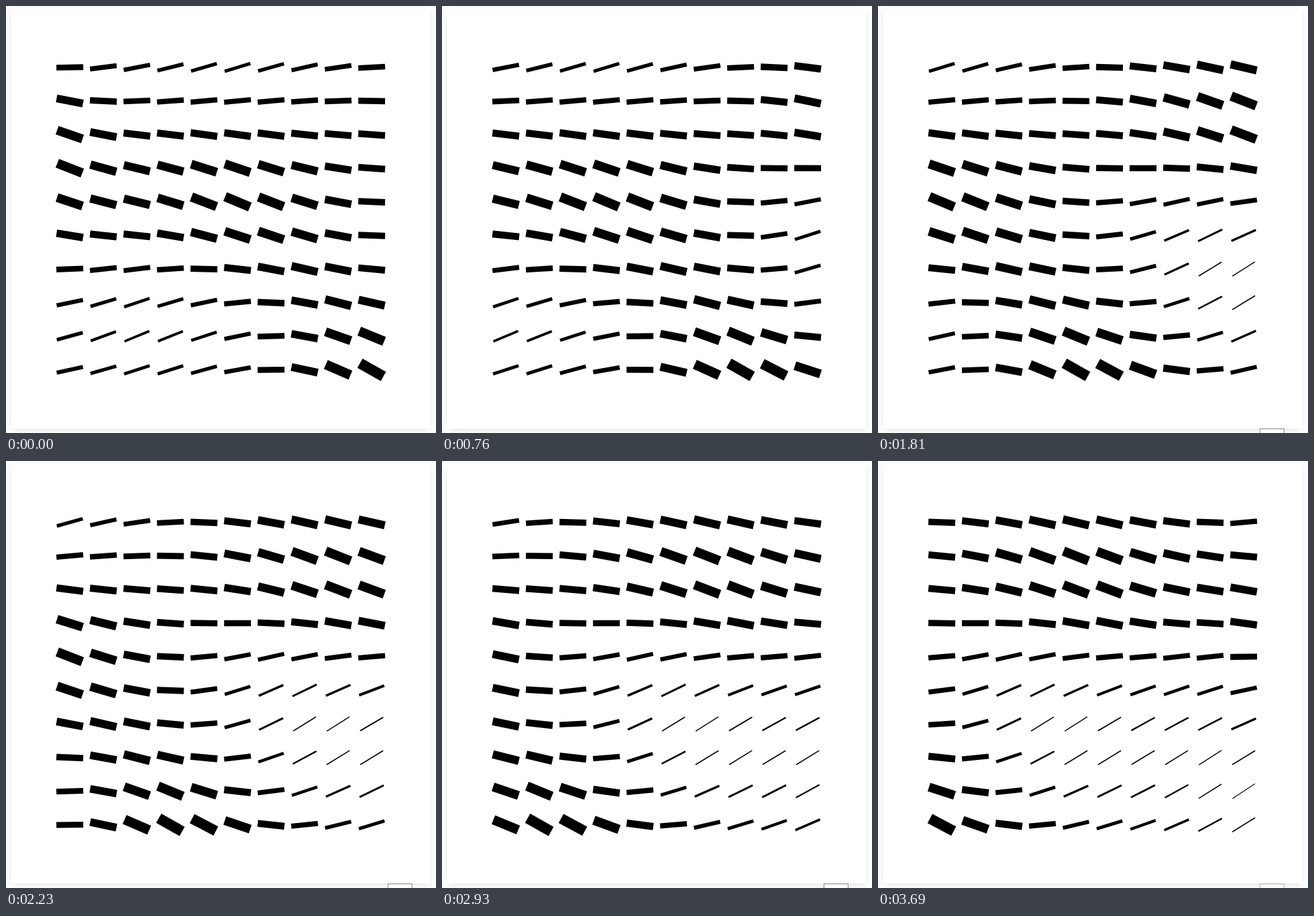
These frames come from a looping animation (676x670 px, 3.76 s). An HTML page with a canvas:

```html
<!DOCTYPE html>
<html lang="en">
<head>
<meta charset="utf-8">
<title>Noise grid</title>
<style>
  html, body { margin: 0; width: 100%; height: 100%; overflow: hidden; background: #fff; }
  .card, canvas, .tip { position: absolute; }
  .card { left: 8px; top: 4px; width: 659px; height: 659px; box-shadow: 0 2px 12px -2px rgba(0, 0, 0, .15); }
  canvas { left: 0; top: 0; }
  .tip { left: 600px; top: 663px; width: 37px; height: 6px; border: 1px solid #808080; border-bottom: 0; background: #fff; }
</style>
</head>
<body>
<div class="card"></div>
<canvas width="676" height="670"></canvas>
<div class="tip"></div>
<script>
const ctx = document.querySelector('canvas').getContext('2d');
const tip = document.querySelector('.tip');

const LOOP = 3760, STEPS = 54;
const GRID = 10, CELL = 52.73, LEFT = 100.3, TOP = 96.3;
const BAR = 42.2, SCALE = 0.6102;
const SCROLL = 0.1874;            // cells per step
const FREQ = 0.0864;              // noise units per cell

// Simplex lattice: [i, j, gradient x, gradient y], placed in cells
const SKEW = (3 - Math.sqrt(3)) / 6;
const lattice = [
  [0, 0, -1, 1], [1, 0, 1, -1], [-1, 0, 0, 1],
  [0, -1, 0, 1], [-1, -1, 0, 1], [1, -1, 1, -1],
  [-2, -1, 1, -1], [-2, -2, 0, -1], [1, 1, -1, 1],
].map(([i, j, gx, gy]) => ({
  x: 11.55 + (i - (i + j) * SKEW) / FREQ,
  y: 8.08 + (j - (i + j) * SKEW) / FREQ,
  gx, gy,
}));

function noise(x, y) {
  let sum = 0;
  for (const p of lattice) {
    const dx = (x - p.x) * FREQ, dy = (y - p.y) * FREQ;
    const falloff = Math.max(0, 0.5 - dx * dx - dy * dy);
    sum += falloff ** 4 * (p.gx * dx + p.gy * dy);
  }
  return 70 * sum;
}

function drawBar(col, row, n) {
  const thickness = (15.5 + 14.5 * n) * SCALE;
  ctx.save();
  ctx.translate(LEFT + col * CELL, TOP + row * CELL);
  ctx.rotate(n * Math.PI * 0.2);
  ctx.fillRect(-BAR / 2, -thickness / 2, BAR, thickness);
  ctx.restore();
}

function render(now) {
  const time = now % LOOP;
  const step = Math.min(STEPS - 1, Math.floor((time + 8) * STEPS / LOOP));
  ctx.clearRect(0, 0, 676, 670);
  for (let row = 0; row < GRID; row++) {
    for (let col = 0; col < GRID; col++) {
      drawBar(col, row, noise(col + step * SCROLL, row));
    }
  }
  tip.style.visibility = step >= 19 ? 'visible' : 'hidden';
  tip.style.opacity = step >= 53 ? 0.6 : 1;
}

const start = performance.now();
function loop() {
  render(performance.now() - start);
  requestAnimationFrame(loop);
}
loop();
</script>
</body>
</html>
```
